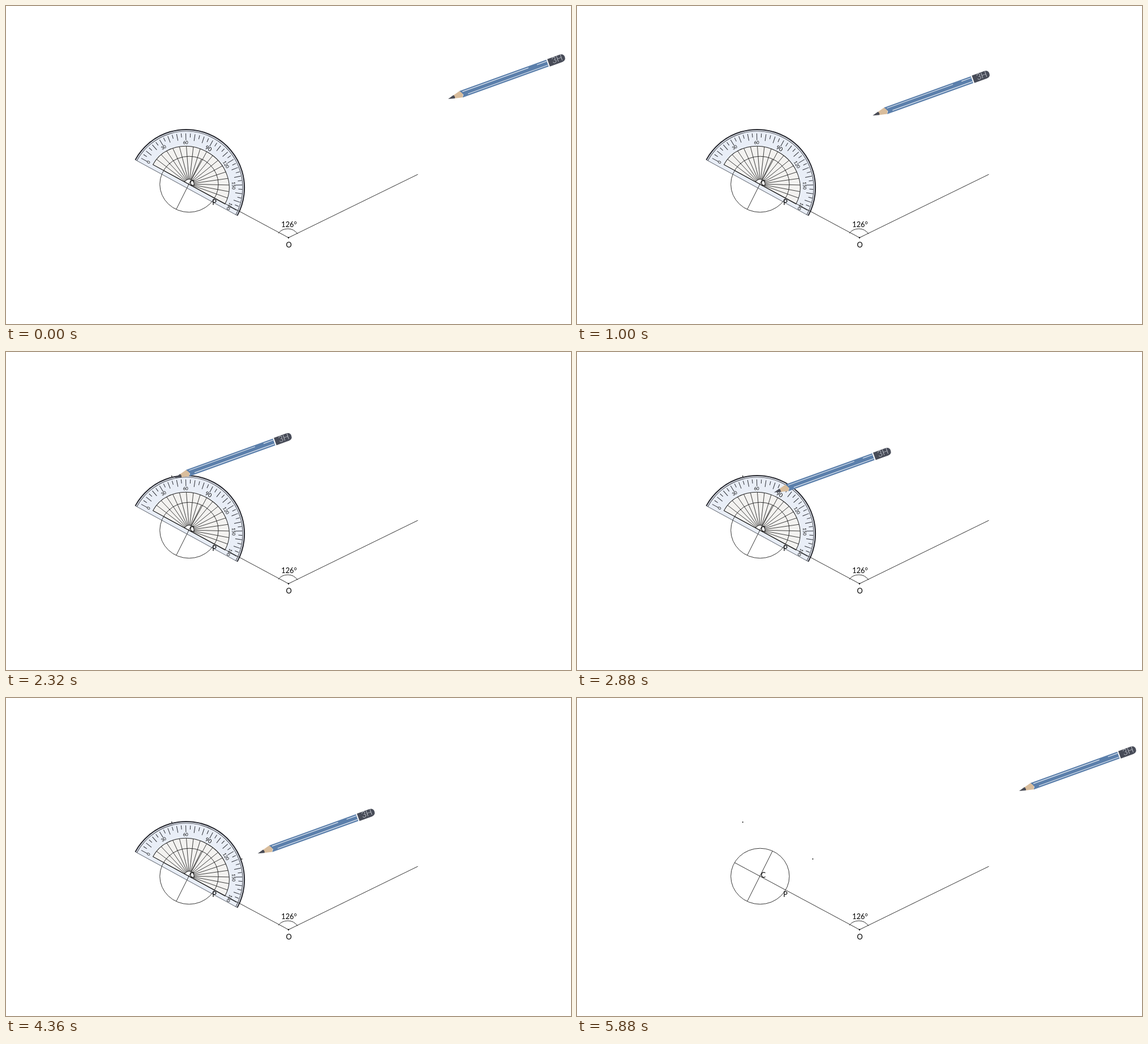
Recreate the animation shown at these times as an HTML page. Size 998 by 561 pixels, loop 5.92 s.

```html
<!DOCTYPE html>
<html lang="en">
<head>
<meta charset="utf-8">
<title>Measuring an angle</title>
<style>
  html, body { margin: 0; width: 100%; height: 100%; overflow: hidden; background: #fff; }
  svg { display: block; width: 100vw; height: 100vh; }
  text { font-family: Lato, "Open Sans", sans-serif; text-anchor: middle; fill: #000; }
  .thin { fill: none; stroke: #1c1c1c; stroke-width: .9; }
  .label { font-size: 12.8px; }
  .stripe { stroke: #e1e8f1; stroke-width: 1.2; }
</style>
</head>
<body>
<svg viewBox="0 0 998 561">
  <g id="protractor" transform="translate(318.5 320.5) rotate(28.6)">
    <path d="M-103 0A103 103 0 0 1 103 0Z" fill="#e9eef7"/>
    <path d="M-71.2 -7.5A72.5 65.5 0 0 1 73.8 -7.5Z" fill="#f3f2f0" stroke="#222" stroke-width="1"/>
    <path d="M-103 0H103" stroke="#555b66" stroke-width=".9"/>
    <path d="M-102.6 0A102.6 102.6 0 0 1 102.6 0" fill="none" stroke="#25262d" stroke-width="2"/>
    <path d="M-99.6 0A99.6 99.6 0 0 1 99.6 0" fill="none" stroke="#33353d" stroke-width=".9"/>
    <g id="scale" transform="translate(1.3 -7.5)"></g>
  </g>

  <g class="thin">
    <ellipse cx="323.4" cy="314.5" rx="51.7" ry="49.3"/>
    <path d="M278 290.2L499 408.7L727.5 297M345.3 270L300.7 358.8M481 401Q487 393 498 393Q508.500 393 515 402"/>
  </g>
  <circle cx="499" cy="408.700" r="1.3"/>
  <g class="label">
    <text x="329" y="316.500">C</text>
    <text x="368" y="350.500">P</text>
    <text x="499.500" y="425.500">O</text>
    <text x="500" y="390">126°</text>
  </g>

  <circle id="markA" cx="292.800" cy="219" r=".9"/>
  <circle id="markB" cx="416.500" cy="284" r=".9"/>

  <g id="pencil">
    <path d="M11 -2.900L24 -6.400L28 0L25 6.200L11 2.900Z" fill="#d9bd9c"/>
    <path d="M0 0L11 -3.100Q13.500 0 11.500 3.100Z" fill="#484b55"/>
    <path d="M23.500 -6.400H186.500V6.400H25L28 2L26 -2.500Z" fill="#5b7fab"/>
    <path class="stripe" d="M28 -3.600H152M168 -3.600H186M36 3.400H186"/>
    <path d="M188.500 -6.900H212Q219 -6.500 219 0Q219 6.500 212 6.900H188.500Z" fill="#484c58"/>
    <text x="205" y="4" font-size="14.500" font-weight="300" style="fill:#e3e6ec">3H</text>
  </g>
</svg>
<script>
const LOOP = 5920, STEP = 40, MOVE_TIME = 1732;
const $ = id => document.getElementById(id);

function add(parent, tag, attrs, content = "") {
  const node = document.createElementNS("http://www.w3.org/2000/svg", tag);
  for (const key in attrs) node.setAttribute(key, attrs[key]);
  node.textContent = content;
  parent.append(node);
}

// Point on the scale: 0 degrees is at the left, 90 at the top.
function onScale(degrees, rx, ry) {
  const a = degrees * Math.PI / 180;
  return [-rx * Math.cos(a), -ry * Math.sin(a)];
}

function buildScale() {
  const scale = $("scale");
  const segment = (from, to) => `M${from}L${to}`;
  let rays = "", ticks = "";
  for (let a = 0; a <= 180; a += 5) {
    const length = a % 10 ? 7 : 12;
    ticks += segment(onScale(a, 96, 88), onScale(a, 96 - length, 88 - length));
    if (a % 10 === 0) rays += segment(onScale(a, 9, 9), onScale(a, 72.5, 65.5));
  }
  add(scale, "path", { d: rays, stroke: "#262626", "stroke-width": .8 });
  add(scale, "path", { d: ticks, stroke: "#2b2d34", "stroke-width": 1 });
  add(scale, "path", { d: "M-9 0A9 9 0 0 1 9 0Z", fill: "#fff", stroke: "#222", "stroke-width": 1 });
  for (let a = 0; a <= 180; a += 30) {
    const [x, y] = onScale(a, 81.5, 71.5);
    add(scale, "text", {
      transform: `translate(${x} ${y}) rotate(${a - 90})`,
      y: 2.8,
      "font-size": a === 90 ? 9.8 : 7.8
    }, a);
  }
}

const rest = [781, 164], pointA = [292.5, 219], pointB = [416.5, 283.5];
const moves = [
  { start: 108, from: rest, to: pointA },
  { start: 2061, from: pointA, to: pointB },
  { start: 4019, from: pointB, to: rest }
];

function ease(u) {
  u = Math.min(1, Math.max(0, u));
  return u < .5 ? 2 * u * u : 1 - 2 * (1 - u) ** 2;
}

function draw(time) {
  const move = moves.filter(m => time >= m.start).pop() || moves[0];
  const k = ease((time - move.start) / MOVE_TIME);
  const [x, y] = move.from.map((v, i) => v + (move.to[i] - v) * k);
  $("pencil").setAttribute("transform", `translate(${x} ${y}) rotate(-19.8)`);
  const show = (id, on) => $(id).setAttribute("visibility", on ? "visible" : "hidden");
  show("markA", time >= 1960);
  show("markB", time >= 3920);
  show("protractor", time < 5880);
}

buildScale();
draw(0);
const begin = performance.now();
function tick() {
  const time = (performance.now() - begin) % LOOP;
  draw(Math.floor(time / STEP) * STEP);
  requestAnimationFrame(tick);
}
requestAnimationFrame(tick);
</script>
</body>
</html>
```
